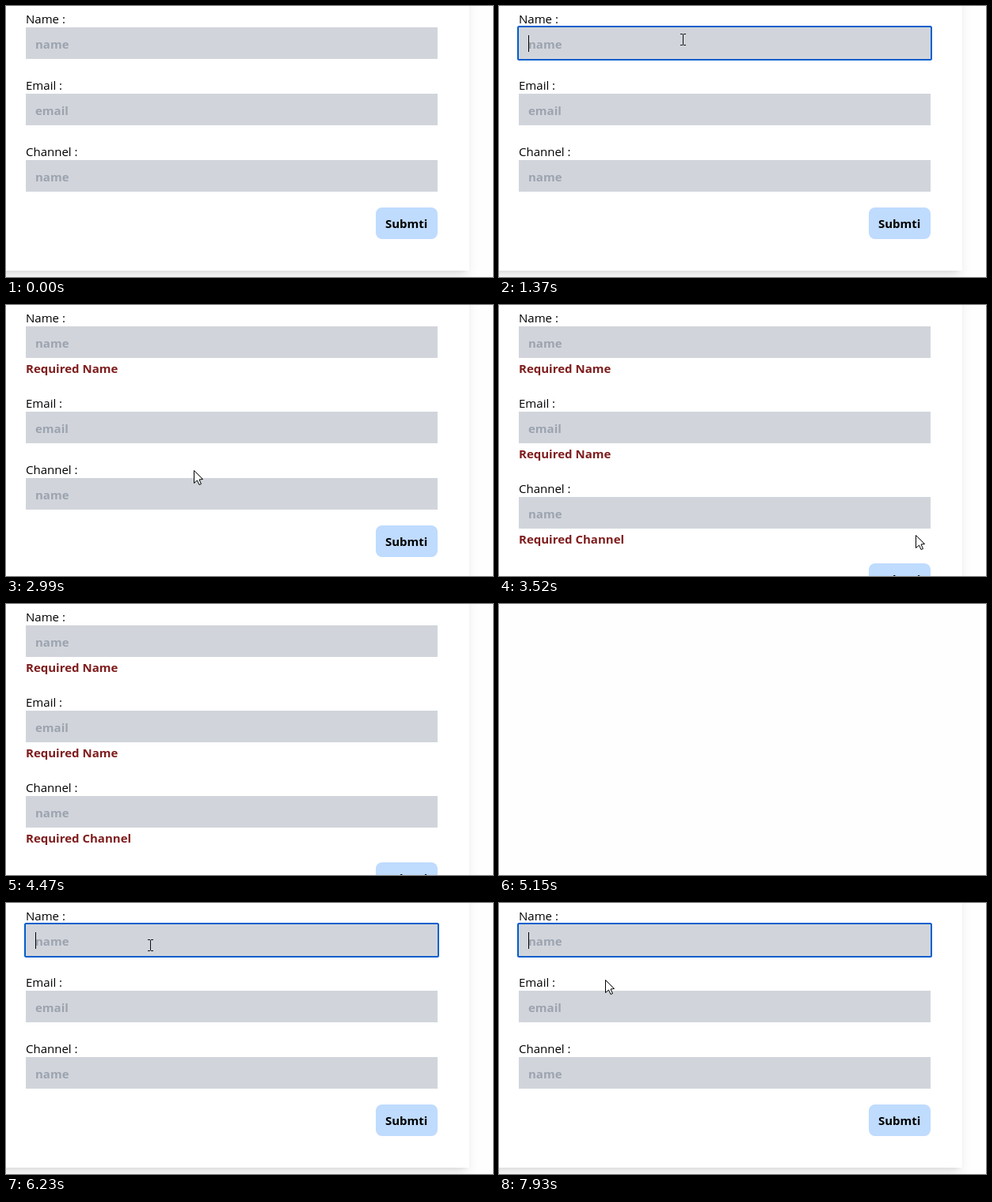
These frames come from a looping animation (615 by 343 pixels, 7990 ms). An HTML page with a canvas:

```html
<!DOCTYPE html>
<html lang="en">
<head>
<meta charset="utf-8">
<title>Form validation</title>
<style>
  html, body { margin: 0; width: 100%; height: 100%; overflow: hidden; background: #fff; }
  canvas { display: block; }
</style>
</head>
<body>
<canvas id="stage" width="615" height="343"></canvas>
<script>
const ctx = document.getElementById('stage').getContext('2d', { alpha: false });
const LOOP = 7990;
const FONT = '"Open Sans", "Noto Sans", sans-serif';
const FIELD = { x: 25, w: 520, h: 40 };
const BUTTON = { x: 467, w: 78, h: 40 };
const ROW_STEP = 84, ERROR_STEP = 24;

// Script of the session, in ms.
const BLUR = 1910, SUBMIT = 3520, RELOAD = 5150, RELOADED = 5290;
const FOCUS = [1060, 5890];
const BLINK_ON = 7500;

const ROWS = [
  { label: 'Name :', hint: 'name', error: 'Required Name', errorAt: BLUR },
  { label: 'Email :', hint: 'email', error: 'Required Name', errorAt: SUBMIT },
  { label: 'Channel :', hint: 'name', error: 'Required Channel', errorAt: SUBMIT },
];

const move = (start, end, x, y) => ({ start, end, x, y });
const VISITS = [
  { from: 480, to: 4470, x: 430, y: 289, moves: [
    move(480, 1000, 232, 42),
    move(1370, 1700, 201, 83),
    move(2300, 2560, 162, 62),
    move(2560, 2990, 237, 209),
    move(3040, 3050, 398, 258),
    move(3110, 3340, 526, 291),
    move(3800, 4470, 103, 45),
  ] },
  { from: 5620, to: LOOP, x: 245, y: 34, moves: [
    move(5620, 5830, 182, 53),
    move(6230, 6770, 140, 125),
    move(7240, 7590, 146, 115),
    move(7790, 7920, 134, 97),
  ] },
];

const within = (t, from, to) => t >= from && t < to;
const ease = k => k * k * (3 - 2 * k);
const isFocused = t => within(t, FOCUS[0], BLUR) || t >= FOCUS[1];
const isPressed = t => within(t, FOCUS[0], FOCUS[0] + 60) || within(t, BLUR, BLUR + 60) ||
  within(t, SUBMIT - 140, SUBMIT) || within(t, FOCUS[1], FOCUS[1] + 60);
const isCaretOn = t => within(t, FOCUS[0], FOCUS[0] + 570) ||
  within(t, FOCUS[1], BLINK_ON - 530) || t >= BLINK_ON;

function pointerAt(t) {
  const visit = VISITS.find(v => within(t, v.from, v.to));
  if (!visit) return null;
  let { x, y } = visit;
  for (const m of visit.moves) {
    if (t < m.start) break;
    const k = ease(Math.min(1, (t - m.start) / (m.end - m.start)));
    x += (m.x - x) * k;
    y += (m.y - y) * k;
  }
  return { x: Math.round(x), y: Math.round(y) };
}

function layout(t) {
  let y = 27;
  const rows = ROWS.map(row => {
    const failed = within(t, row.errorAt, RELOAD);
    const placed = { ...row, y, failed };
    y += ROW_STEP + (failed ? ERROR_STEP : 0);
    return placed;
  });
  return { rows, buttonY: y - 24, bottom: y + 56 };
}

function rect(x, y, w, h, color) {
  ctx.fillStyle = color;
  ctx.fillRect(x, y, w, h);
}

function rounded(x, y, w, h, r) {
  ctx.beginPath();
  ctx.roundRect(x, y, w, h, r);
}

function text(str, x, y, color, weight = 400) {
  ctx.font = `${weight} 15px ${FONT}`;
  ctx.fillStyle = color;
  ctx.fillText(str, x, y);
}

function shadow(bottom, inset, offset, blur) {
  ctx.save();
  ctx.shadowColor = 'rgba(0,0,0,0.1)';
  ctx.shadowBlur = blur;
  ctx.shadowOffsetY = offset;
  rect(-60, -60, 645 - inset, bottom + 60 - inset, '#fff');
  ctx.restore();
}

function drawCard(bottom) {
  shadow(bottom, 3, 10, 15);
  shadow(bottom, 4, 4, 6);
  rect(-60, -60, 645, bottom + 60, '#fff');
}

function drawForm(t, { rows, buttonY, bottom }) {
  drawCard(bottom);
  for (const row of rows) {
    text(row.label, FIELD.x, row.y - 5, '#000');
    rect(FIELD.x, row.y, FIELD.w, FIELD.h, '#d1d5db');
    text(row.hint, FIELD.x + 12, row.y + 27, '#9ca3af', 700);
    if (row.failed) text(row.error, FIELD.x, row.y + 59, '#7f1d1d', 700);
  }
  ctx.fillStyle = '#bfdbfe';
  rounded(BUTTON.x, buttonY, BUTTON.w, BUTTON.h, 8);
  ctx.fill();
  text('Submti', BUTTON.x + 12, buttonY + 26, '#000', 700);

  if (isFocused(t)) {
    ctx.strokeStyle = '#005fcc';
    ctx.lineWidth = 2;
    rounded(FIELD.x - 1, rows[0].y - 1, FIELD.w + 2, FIELD.h + 2, 1.5);
    ctx.stroke();
  }
  if (isCaretOn(t)) rect(FIELD.x + 12, 37, 1, 21, '#000');
}

function inkShape() {
  ctx.fillStyle = '#fff';
  ctx.strokeStyle = '#000';
  ctx.lineWidth = 1;
  ctx.stroke();
  ctx.fill();
}

function drawArrow(x, y) {
  ctx.save();
  ctx.translate(x + 0.5, y + 0.5);
  const shape = new Path2D('M0 0V16L4 12.5L6.5 18L9 17L6.5 11.5L11 11Z');
  ctx.fillStyle = '#fff';
  ctx.strokeStyle = '#000';
  ctx.lineWidth = 1;
  ctx.fill(shape);
  ctx.stroke(shape);
  ctx.restore();
}

function drawHand(x, y) {
  rounded(x - 5, y + 7, 15, 13, 4);
  ctx.roundRect(x - 1, y, 3, 14, 1.5);
  inkShape();
}

function drawBeam(x, y) {
  rect(x, y - 6, 1, 13, '#111');
  for (const dy of [-7, 7]) {
    rect(x - 3, y + dy, 3, 1, '#111');
    rect(x + 1, y + dy, 3, 1, '#111');
  }
}

function drawPointer(t, { x, y }, { rows, buttonY }) {
  const over = (box, top) => within(x, box.x, box.x + box.w) && within(y, top, top + box.h);
  if (rows.some(row => over(FIELD, row.y))) drawBeam(x, y);
  else if (over(BUTTON, buttonY)) drawHand(x, y);
  else drawArrow(x, y);

  if (isPressed(t)) {
    ctx.fillStyle = 'rgba(255,255,0,0.47)';
    ctx.beginPath();
    ctx.arc(x, y, 12, 0, 2 * Math.PI);
    ctx.fill();
  }
}

function draw(t) {
  rect(0, 0, 615, 343, '#fefefe');
  if (within(t, RELOAD, RELOADED)) return;
  const form = layout(t);
  drawForm(t, form);
  const pointer = pointerAt(t);
  if (pointer) drawPointer(t, pointer, form);
}

const start = performance.now();
function tick() {
  draw((performance.now() - start) % LOOP);
  requestAnimationFrame(tick);
}
tick();
</script>
</body>
</html>
```
